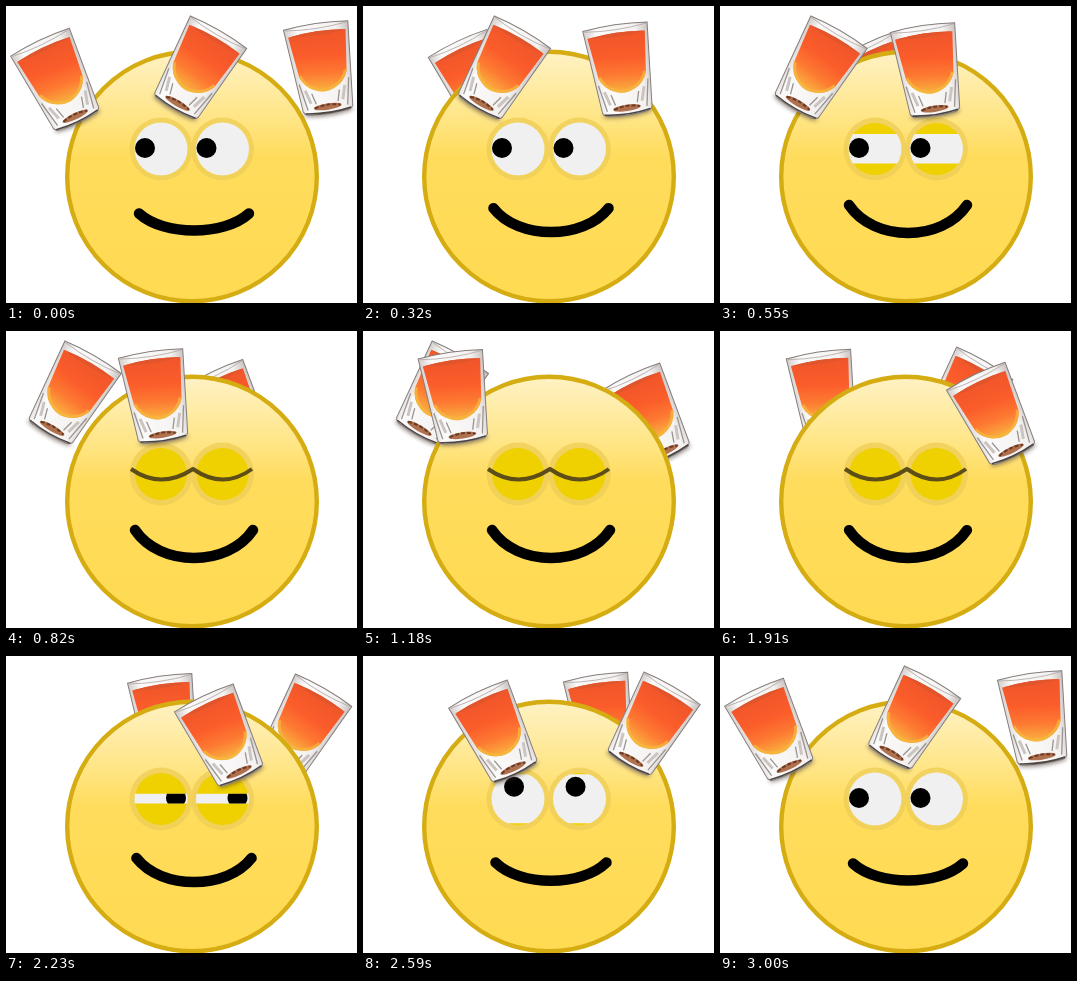
Animation of 351x297 px, one loop 3.05 s. Source, as an HTML page:

```html
<!DOCTYPE html>
<html lang="en">
<head>
<meta charset="utf-8">
<title>Juggling smiley</title>
<style>
  html, body { margin: 0; width: 100%; height: 100%; overflow: hidden; background: #fff; }
  svg { display: block; width: 100vw; height: 100vh; }
</style>
</head>
<body>
<svg viewBox="0 0 351 297">
  <defs>
    <linearGradient id="skin" x1="0" y1="0" x2="0" y2="1">
      <stop offset="0" stop-color="#fff2c4"/>
      <stop offset=".25" stop-color="#ffe68a"/>
      <stop offset=".42" stop-color="#ffdc5c"/>
      <stop offset="1" stop-color="#ffda52"/>
    </linearGradient>
    <linearGradient id="drink" x1=".55" y1="0" x2=".45" y2="1">
      <stop offset="0" stop-color="#f0562a"/>
      <stop offset=".4" stop-color="#fb5c2a"/>
      <stop offset=".7" stop-color="#fd7a32"/>
      <stop offset="1" stop-color="#f9b440"/>
    </linearGradient>
    <linearGradient id="cup">
      <stop offset="0" stop-color="#d2cdca"/>
      <stop offset=".2" stop-color="#fbfafa"/>
      <stop offset=".8" stop-color="#f4f2f1"/>
      <stop offset="1" stop-color="#c8c2c0"/>
    </linearGradient>
    <filter id="soft" x="-30%" y="-100%" width="160%" height="300%"><feGaussianBlur stdDeviation="2"/></filter>
    <clipPath id="slit"><rect id="gap" x="120" width="130"/></clipPath>
    <g id="glass">
      <ellipse cy="44" rx="25" ry="4" fill="#4a3b30" opacity=".6" filter="url(#soft)"/>
      <path d="M-32.5-43Q0-47 32.5-43L25 41Q23 45 18 45Q0 47-18 45Q-23 45-25 41Z" fill="url(#cup)" stroke="#857d7a"/>
      <path d="M-29-35Q0-39 29-35L24 6Q20 17 10 21Q0 26-10 21Q-20 17-24 6Z" fill="url(#drink)"/>
      <path d="M-23 5Q-19 16-9 20Q0 24 9 20Q19 16 23 5" fill="none" stroke="#f6b83e" stroke-width="3" opacity=".75"/>
      <path d="M-29-35Q0-39 29-35Q0-31-29-35Z" fill="#e0552c"/>
      <path d="M-31-42Q0-38 31-42" fill="none" stroke="#b3aba8" stroke-width=".8"/>
      <path d="M-25 13L-20 40M25 13L20 40M-14 24L-11 35M14 24L11 35" fill="none" stroke="#9b9390" stroke-width="1.3"/>
      <path d="M-20 20L-16 34M20 20L16 34" fill="none" stroke="#cbc5c2" stroke-width="3"/>
      <ellipse cy="39" rx="14" ry="3.2" fill="#b0714e"/>
      <path d="M-13 39Q0 35 13 39" fill="none" stroke="#6b3b26" stroke-width="2" stroke-dasharray="4 2"/>
      <path d="M-23 43Q0 47 23 43" fill="none" stroke="#4c4542" stroke-width="1.6"/>
    </g>
  </defs>
  <rect width="351" height="297" fill="#fff"/>
  <g id="back"></g>
  <circle cx="186" cy="170.5" r="124.8" fill="url(#skin)" stroke="#d5ac12" stroke-width="4.4"/>
  <g fill="#efcf58" opacity=".8"><circle cx="155" cy="143" r="31.5"/><circle cx="216.5" cy="143" r="31.5"/></g>
  <g fill="#efd000"><circle cx="155" cy="143" r="26"/><circle cx="216.5" cy="143" r="26"/></g>
  <g clip-path="url(#slit)">
    <g fill="#f0f0f0"><circle cx="155" cy="143" r="26.5"/><circle cx="216.5" cy="143" r="26.5"/></g>
    <g id="pupils"><circle r="10"/><circle cx="61.5" r="10"/></g>
  </g>
  <path id="lashes" d="M125 138Q155 159 187 138Q217 159 246 138" fill="none" stroke="#5d4d16" stroke-width="4" stroke-linejoin="round"/>
  <path id="mouth" fill="none" stroke="#000" stroke-width="10.5" stroke-linecap="round"/>
  <g id="front"></g>
</svg>
<script>
const LOOP = 3050, FPS = 22, LAST = 66, QUARTER = Math.PI / 2;
const el = id => document.getElementById(id);
const { sin, cos, min, max, PI } = Math;

const ramp = (from, to, n) => min(1, max(0, (n - from) / (to - from)));
const ease = (from, to, n) => (1 - cos(PI * ramp(from, to, n))) / 2;
const arc = n => sin(PI * n / LAST);

// Out and back along a cosine: 0 at both ends of the loop, 1 halfway.
const HALF = LAST / 2, REACH = 1 - cos(2.42);
const sweep = n => 1 - (1 - cos(2.42 * (n - HALF) / HALF)) / REACH;

// Starts mid-way, swings to the far left, far right, and home again.
function swing(n) {
  const left = 21, right = 52.4;
  if (n < left) return -130 * sin(QUARTER * (n / left) ** 1.2);
  if (n < right) return -130 + 242 * ease(left, right, n);
  return 112 * cos(QUARTER * ramp(right, LAST, n));
}

const glasses = [
  { tilt: -25.5, behind: [1, 32], x: n => 52.5 + 252 * sweep(n), y: n => 75 + 11 * arc(n) ** 2 },
  { tilt: -8.5, behind: [33, 65], x: n => 316 - 240 * sweep(n), y: n => 62 + 4 * arc(n) },
  { tilt: 30, behind: [21, 52], x: n => 191 + swing(n), y: n => 63.5 + 8 * max(0, -sin(2 * PI * n / LAST)) }
];

for (const glass of glasses) {
  glass.node = document.createElementNS("http://www.w3.org/2000/svg", "use");
  glass.node.setAttribute("href", "#glass");
  el("front").append(glass.node);
}

function drawGlass({ node, tilt, behind, x, y }, n) {
  node.setAttribute("transform", `translate(${x(n)} ${y(n)}) rotate(${tilt})`);
  const layer = el(n >= behind[0] && n <= behind[1] ? "back" : "front");
  if (node.parentNode !== layer) layer.append(node);
}

function drawEyes(n) {
  const open = 1 - ramp(7, 18, n) + ramp(47, 58, n);
  el("gap").setAttribute("y", 142.7 - 27 * open);
  el("gap").setAttribute("height", 54 * open);
  el("lashes").style.display = open > 0 ? "none" : "";

  // The pupils look left, then roll from right over the top while waking.
  const angle = n < 40 ? PI : PI * ramp(49, 63, n);
  const px = 154.5 - 15.5 * -cos(angle), py = 142 - 11.5 * sin(angle);
  el("pupils").setAttribute("transform", `translate(${px} ${py})`);
}

function drawMouth(n) {
  const smile = ease(0, 12, n) * (1 - ease(40, 62, n));
  const x = 133 - 4 * smile, y = 207.5 - 8.5 * smile;
  const pull = y + (17 + 11 * smile) / .75;
  el("mouth").setAttribute("d", `M${x} ${y}C${x + 25} ${pull} ${351 - x} ${pull} ${376 - x} ${y}`);
}

function draw(ms) {
  const tick = Math.floor((ms % LOOP) / 10) * 10 + 5;
  const n = min(LAST, Math.floor(tick * FPS / 1000));
  for (const glass of glasses) drawGlass(glass, n);
  drawEyes(n);
  drawMouth(n);
}

const start = performance.now();
function loop() {
  draw(performance.now() - start);
  requestAnimationFrame(loop);
}
loop();
</script>
</body>
</html>
```
